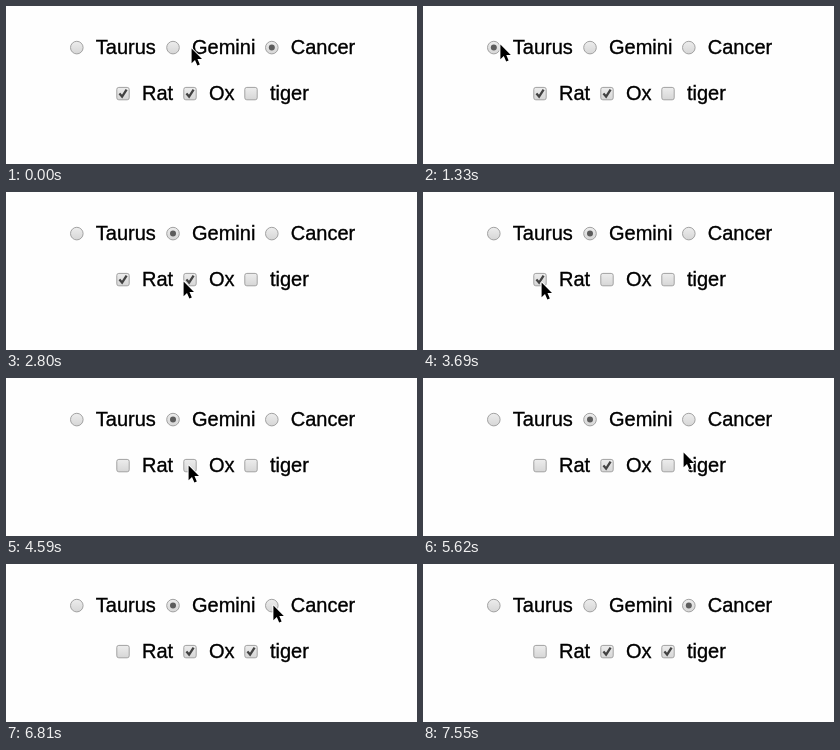
An HTML page for the animation above (8.54 s loop, 411 by 158 pixels).

```html
<!DOCTYPE html>
<html lang="en">
<head>
<meta charset="utf-8">
<title>Radio buttons and checkboxes</title>
<style>
  html, body { margin: 0; width: 100%; height: 100%; overflow: hidden; background: #fefefe; }
  svg { display: block; }
  text { font: 20px "Liberation Sans", Arial, Helvetica, sans-serif; stroke: #000; stroke-width: .35; }
  .box { fill: url(#face); stroke: #a2a2a2; }
  .dot { fill: #5c5c5c; }
  .tick { fill: none; stroke: #424242; stroke-width: 2.3; }
  #cursor { stroke: #fff; stroke-width: 2; stroke-linejoin: round; paint-order: stroke; }
</style>
</head>
<body>
<svg width="411" height="158" viewBox="0 0 411 158">
  <defs>
    <linearGradient id="face" x1="0" y1="0" x2="0" y2="1">
      <stop offset="0" stop-color="#ededed"/>
      <stop offset="1" stop-color="#d6d6d6"/>
    </linearGradient>
  </defs>
  <g id="controls"></g>
  <path id="cursor" d="M.6 1V15.6L4 12.4L6.4 17.8L8.8 16.8L6.5 11.5H11Z"/>
</svg>
<script>
const LOOP = 8540, TICKS = 58, TRAVEL = 4;
const group = document.getElementById("controls");
const cursor = document.getElementById("cursor");
const controls = {};

function add(tag, attrs) {
  const el = document.createElementNS("http://www.w3.org/2000/svg", tag);
  for (const key in attrs) el.setAttribute(key, attrs[key]);
  return group.appendChild(el);
}

function addControl(name, x, y, radio) {
  if (radio) add("circle", { class: "box", cx: x, cy: y, r: 6.3 });
  else add("rect", { class: "box", x: x - 6.2, y: y - 6.2, width: 12.4, height: 12.4, rx: 2 });
  const mark = radio
    ? add("circle", { class: "dot", cx: x, cy: y, r: 3 })
    : add("path", { class: "tick", d: `M${x - 3.6} ${y}l2.7 3L${x + 3.6} ${y - 4}` });
  add("text", { x: x + 19, y: y + 6.4 }).textContent = name;
  controls[name] = { x, y, radio, mark };
}

addControl("Taurus", 70.8, 41.6, true);
addControl("Gemini", 167, 41.6, true);
addControl("Cancer", 265.8, 41.6, true);
addControl("Rat", 117, 87.6);
addControl("Ox", 184, 87.6);
addControl("tiger", 245, 87.6);

// Pointer stops: arrival tick, nearest control, offset from it, click
const stops = [
  [0, "Gemini", 18, 0],
  [2, "Gemini", 4, 2, true],
  [3, "Gemini", 16, 0],
  [8, "Taurus", 0, 0, true],
  [9, "Taurus", 6, -4],
  [15, "Gemini", 1, 1, true],
  [19, "Ox", -7, 1],
  [21, "Ox", -4, 2, true],
  [25, "Rat", 1, 2],
  [27, "Rat", 0, 2, true],
  [31, "Ox", -2, -1],
  [33, "Ox", 0, 0, true],
  [36, "Ox", 2, 2],
  [38, "tiger", 15, -14],
  [41, "tiger", 2, 0, true],
  [46, "Cancer", 1, -1],
  [47, "Cancer", 1, -1, true],
  [51, "Cancer", 122, 128]
].map(([at, name, dx, dy, click]) =>
  ({ at, name, click, x: controls[name].x + dx, y: controls[name].y + dy }));

const ease = u => u * u * (3 - 2 * u);

// Rest at each stop, then travel so as to arrive on time
function pointer(tick) {
  const i = stops.findIndex(s => s.at > tick);
  if (i < 0) return stops[stops.length - 1];
  const a = stops[i - 1], b = stops[i];
  const start = Math.max(a.at, b.at - TRAVEL);
  const k = ease(Math.max(0, (tick - start) / (b.at - start)));
  return { x: a.x + (b.x - a.x) * k, y: a.y + (b.y - a.y) * k };
}

function checkedAt(tick) {
  let checks = new Set(["Rat", "Ox"]), choice = "Cancer";
  for (const { at, name, click } of stops) {
    if (!click || at > tick) continue;
    if (controls[name].radio) choice = name;
    else if (!checks.delete(name)) checks.add(name);
  }
  return checks.add(choice);
}

function draw() {
  const tick = Math.floor(performance.now() % LOOP / LOOP * TICKS);
  const { x, y } = pointer(tick);
  cursor.setAttribute("transform", `translate(${x} ${y})`);
  const checked = checkedAt(tick);
  for (const name in controls)
    controls[name].mark.setAttribute("opacity", checked.has(name) ? 1 : 0);
  requestAnimationFrame(draw);
}
draw();
</script>
</body>
</html>
```
